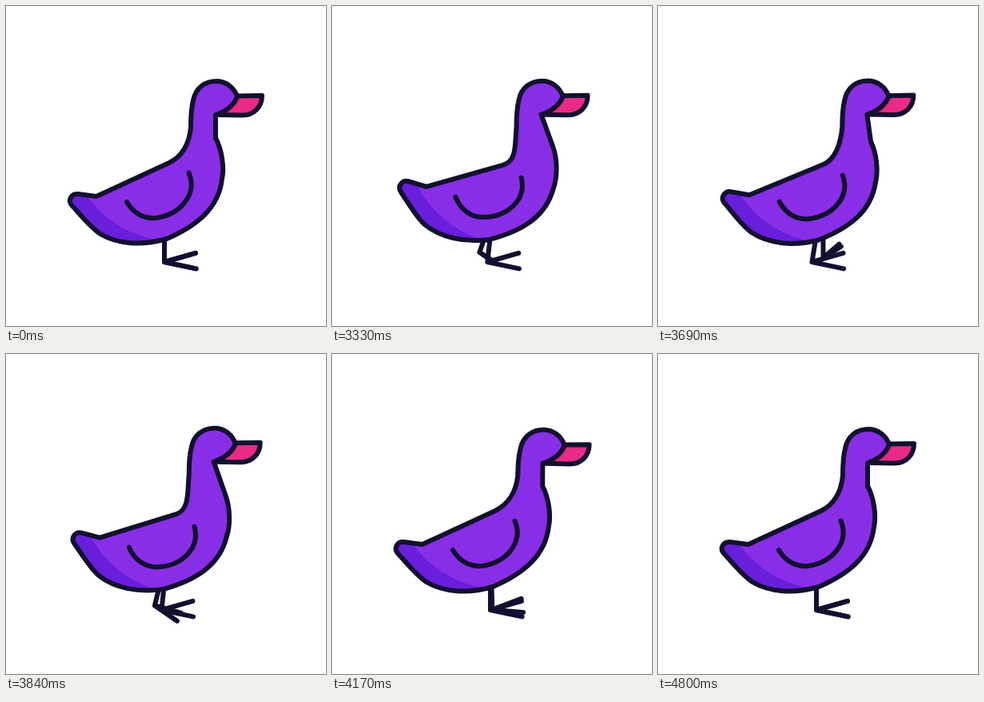
These frames come from a looping animation (400 px wide and 400 px high, 4.86 s). An HTML page:

```html
<!DOCTYPE html>
<html lang="en">
<head>
<meta charset="utf-8">
<title>Walking duck</title>
<style>
  html, body { margin: 0; width: 100%; height: 100%; overflow: hidden; background: #fff; }
  svg { display: block; width: 100vw; height: 100vh; }
  .line { fill: none; stroke: #12102f; stroke-width: 6; stroke-linecap: round; stroke-linejoin: round; }
</style>
</head>
<body>
<svg viewBox="0 0 400 400">
  <path id="legA" class="line"/>
  <path id="legB" class="line"/>
  <path id="beak" fill="#ea2b86"/>
  <path id="beakShade" fill="#d3257f"/>
  <path id="beakLine" class="line"/>
  <path id="body" fill="#882ee7"/>
  <path id="shade" fill="#681edb"/>
  <path id="outline" class="line"/>
  <path id="wing" class="line"/>
</svg>
<script>
const LOOP = 4860, STEP = 30;
const WALK = 3000, WALK_END = 4110;
const { sin, cos, PI } = Math;
const rad = deg => deg * PI / 180;

// Smooth hill: 1 at the centre, 0 beyond the half width
function bump(t, centre, half) {
  const d = (t - centre) / half;
  return Math.abs(d) < 1 ? cos(d * PI / 2) ** 2 : 0;
}

// Progress of a leg swing, 0 while the foot is down
function swing(t, start, length) {
  const u = (t - start) / length;
  return u > 0 && u < 1 ? u : 0;
}

// Returns a function that places a point of a rigid part
function mover(cx, cy, dx, dy, turn) {
  const c = cos(rad(turn)), s = sin(rad(turn));
  return (x, y) => {
    const px = x - cx, py = y - cy;
    return `${(cx + dx + px * c - py * s).toFixed(2)} ${(cy + dy + px * s + py * c).toFixed(2)} `;
  };
}

function set(id, d) {
  document.getElementById(id).setAttribute('d', d);
}

function legPath(t, u) {
  const lift = sin(PI * u), reach = -14 * sin(2 * PI * u);
  const x = 198 - 6 * bump(t, 3580, 580) + reach;
  const y = 320 - 15 * lift * (1.25 - u);
  const angle = 40 * sin(2 * PI * u) + 8 * lift - 2;
  const length = 40.5 - 20 * lift, spread = 14 * (1 - lift);
  const toe = side => {
    const a = rad(angle + side * spread);
    return `M${x} ${y}L${x + length * cos(a)} ${y + length * sin(a)}`;
  };
  return `M${198 + reach * 0.6} 286L${x} ${y}${toe(-1)}${toe(1)}`;
}

function headPose(t) {
  const walking = t > WALK && t < WALK_END;
  const beat = (t - WALK) / (WALK_END - WALK) * 3;
  const sway = walking ? 2 * (cos(2 * PI * beat) - 1) : 0;
  const peck = bump(t, 4380, 270);
  const back = sway - 2 * bump(t, 4720, 80);
  return { x: back + 13 * peck, y: 0.6 * back + 5.8 * peck, turn: 4.5 * peck, push: 8 * peck };
}

function draw(t) {
  const head = headPose(t);
  const tilt = 9 * bump(t, 3330, 300) + 8 * bump(t, 3880, 300);
  const H = mover(263, 120, head.x, head.y, head.turn);
  const B = mover(190, 226.5, 0.65 * tilt, 2 * bump(t, 3810, 320), tilt);
  const chest = (x, y, k) => B(x + head.push * k, y);

  set('legA', legPath(t, swing(t, 3180, 400) + swing(t, 3800, 380)));
  set('legB', legPath(t, swing(t, 3450, 320)));

  const beak = 'M' + H(288, 112.6) + 'L' + H(320, 112)
    + 'C' + H(320, 127) + H(309, 136.5) + H(296, 136.5) + 'L' + H(264, 136) + 'Z';
  set('beak', beak);
  set('beakLine', beak);
  set('beakShade', 'M' + H(288, 113) + 'L' + H(293, 114)
    + 'C' + H(290, 124) + H(283, 131) + H(273, 136) + 'L' + H(264, 136) + 'Z');

  const belly = 'C' + B(170, 300) + B(140, 298) + B(118, 285)
    + 'C' + B(105, 276) + B(94, 262) + B(83, 250)
    + 'C' + B(76, 243) + B(82, 234) + B(90, 235);
  const duck = 'M' + B(113, 238) + 'L' + B(204, 196)
    + 'C' + B(220, 188) + H(229, 172) + H(231, 152)
    + 'C' + H(231, 136) + H(232, 126) + H(234, 118)
    + 'C' + H(237, 102) + H(249, 94) + H(263, 94)
    + 'C' + H(275, 94) + H(285, 102) + H(289, 113)
    + 'C' + H(286, 123) + H(275, 132) + H(262, 136)
    + 'L' + chest(262, 165, 1.2)
    + 'C' + chest(270, 180, 1.1) + chest(273, 202, 1) + chest(270, 216, 0.8)
    + 'C' + chest(266, 252, 0.4) + B(240, 274) + B(201, 291)
    + belly + 'Z';
  set('body', duck);
  set('outline', duck);
  set('shade', 'M' + B(201, 291) + belly + 'L' + B(101, 237)
    + 'C' + B(118, 262) + B(148, 285) + B(188, 292) + 'Z');

  set('wing', 'M' + B(151, 245) + 'C' + B(161, 262) + B(176, 266) + B(187, 265)
    + 'C' + B(217, 261) + B(240, 236) + B(228.5, 208.5));
}

const start = performance.now();
function tick() {
  const t = (performance.now() - start) % LOOP;
  draw(Math.floor(t / STEP) * STEP);
  requestAnimationFrame(tick);
}
tick();
</script>
</body>
</html>
```
